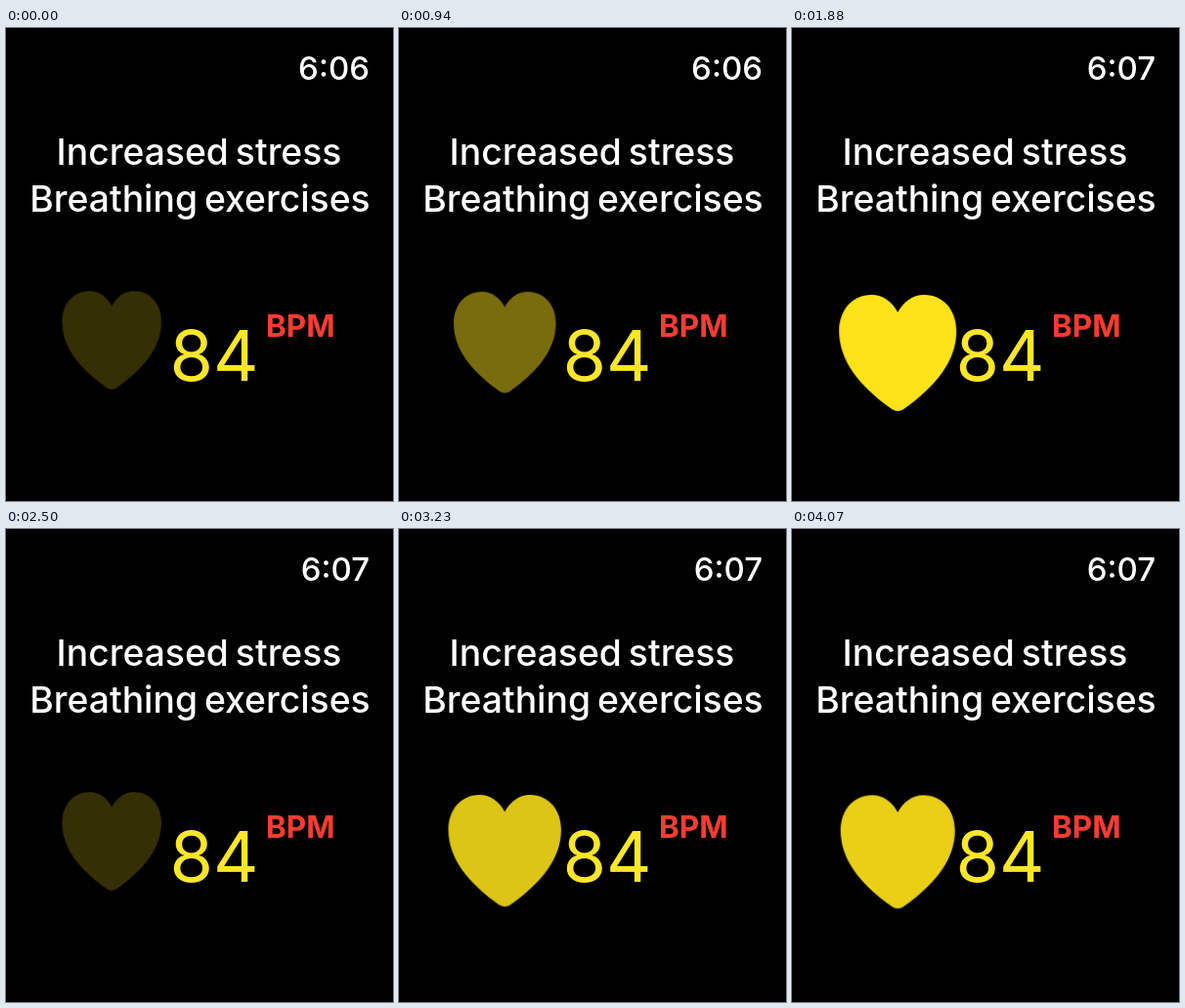
Write an HTML page that moves like this. It is 396x484 px and loops after 4150 ms.

```html
<!DOCTYPE html>
<html lang="en">
<head>
<meta charset="utf-8">
<title>Stress alert</title>
<style>
  html, body { margin: 0; width: 100%; height: 100%; overflow: hidden; background: #000; }
  svg { display: block; width: 396px; height: 484px; }
  text { font-family: Inter, sans-serif; fill: #fff; }
  .clock { font-size: 33px; font-weight: 500; text-anchor: end; }
  .message { font-size: 37.3px; font-weight: 450; word-spacing: -3px; text-anchor: middle; }
  .rate { font-size: 72px; fill: #ffe62a; }
  .unit { font-size: 31.5px; font-weight: 700; fill: #fc3c32; }
  #heart { fill: #fee31a; }
</style>
</head>
<body>
<svg viewBox="0 0 396 484">
  <text id="before" class="clock" x="372" y="53">6:06</text>
  <text id="after" class="clock" x="372" y="53" opacity="0">6:07</text>
  <text class="message" x="197.5" y="139.5">Increased stress</text>
  <text class="message" x="198.5" y="187.5">Breathing exercises</text>
  <path id="heart" d="M0 18C-6 7-15 0-27 0C-46 0-60 15-60 37C-60 67-40 93-6 117Q0 121 6 117C40 93 60 67 60 37C60 15 46 0 27 0C15 0 6 7 0 18Z"/>
  <text class="rate" x="167.5" y="361">84</text>
  <text class="unit" x="266" y="316">BPM</text>
</svg>
<script>
  const LOOP = 4150;
  const HALF_BEAT = 625;
  const TICK = HALF_BEAT / 6;
  const MINUTE_CHANGE = 2 * HALF_BEAT + TICK;

  // Each half beat moves for three ticks, then rests until the next one.
  const beats = [];
  for (let half = 0; half * HALF_BEAT < LOOP; half++) {
    for (let tick = 0; tick < 4; tick++) {
      const progress = Math.sin(.353 * tick) ** 1.3;
      const swell = half % 2 ? 1 - progress : progress;
      beats.push([half * HALF_BEAT + tick * TICK, swell]);
    }
  }

  function play(id, steps, pose) {
    const frames = steps.map(([time, value]) => ({
      offset: time / LOOP, easing: "steps(1, end)", ...pose(value),
    }));
    frames.push({ ...frames.at(-1), offset: 1 });
    document.getElementById(id).animate(frames, { duration: LOOP, iterations: Infinity });
  }

  const heartPose = swell => ({
    transform: `translate(108.2px, ${269.2 + 3.8 * swell}px) scale(${.846 + .154 * swell})`,
    opacity: .21 + .79 * swell ** .6,
  });
  const fade = opacity => ({ opacity });

  play("heart", beats, heartPose);
  play("before", [[0, 1], [MINUTE_CHANGE, 0]], fade);
  play("after", [[0, 0], [MINUTE_CHANGE, 1]], fade);
</script>
</body>
</html>
```
